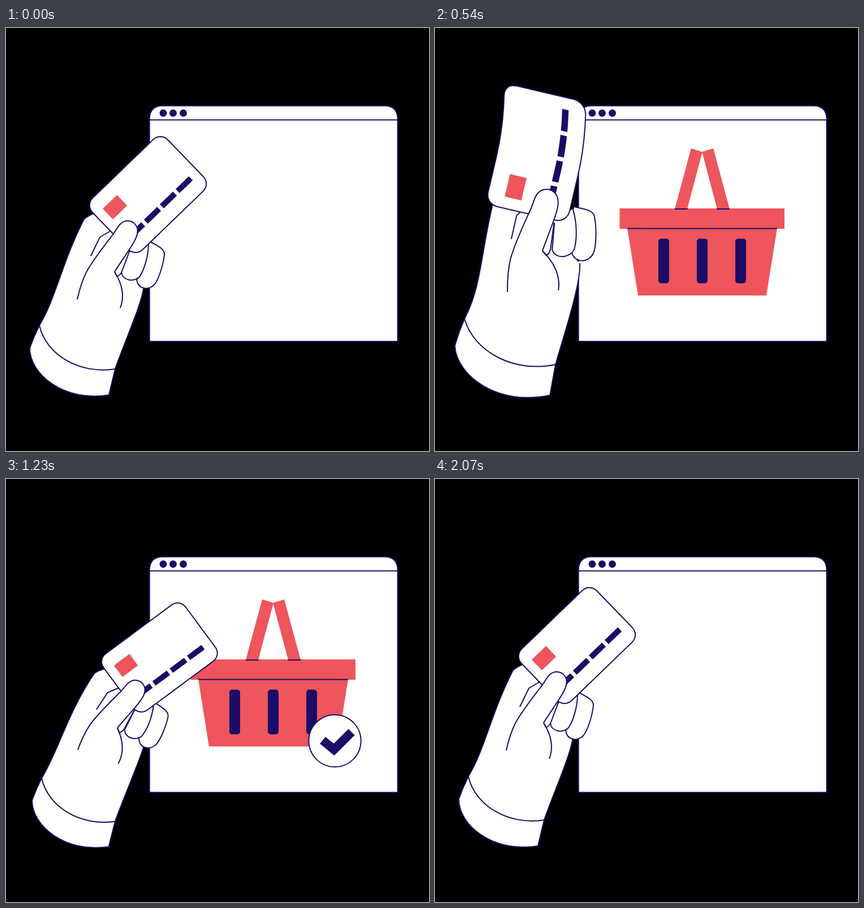
An HTML page for the animation above (2.1 s loop, 748 by 748 pixels).

```html
<!DOCTYPE html>
<html lang="en">
<head>
<meta charset="utf-8">
<title>Online checkout</title>
<style>
  html, body { margin: 0; width: 100%; height: 100%; overflow: hidden; background: #000; }
  svg { display: block; width: 100vw; height: 100vh; }
  .line { fill: none; stroke: #1b0c66; stroke-width: 2; stroke-linejoin: round; }
  .paper { fill: #fff; }
  .navy { fill: #1b0c66; }
  .red { fill: #ee555d; }
  .hand path { vector-effect: non-scaling-stroke; }
</style>
</head>
<body>
<svg viewBox="0 0 748 748">
  <clipPath id="screen"><rect x="254" y="163" width="438" height="390"/></clipPath>

  <path class="line paper" d="M253.7 554.3V161Q254 137.4 277 137.4H669Q692.6 137.4 692.6 161V554.3Z"/>
  <path class="line" d="M254 162.5H692"/>
  <g class="navy">
    <circle cx="278" cy="150.5" r="6.5"/><circle cx="295.5" cy="150.5" r="6.5"/><circle cx="313.5" cy="150.5" r="6.5"/>
  </g>

  <g id="basket">
    <path id="handles" class="red"/>
    <path id="body" class="red"/>
    <path id="rim" class="red"/>
    <path id="seams" class="line"/>
    <path id="slots" class="line navy" style="stroke-width:10"/>
  </g>

  <g id="badge">
    <circle class="line paper" r="46"/>
    <path id="check" class="line" d="M-21.5 -1L-1.5 15.5L29.5 -15.5" pathLength="1"
      style="stroke-width:15.5;stroke-linejoin:miter;stroke-dasharray:1 2"/>
  </g>

  <path id="arm" class="line paper"/>
  <path id="cuff" class="line"/>
  <g id="fingers" class="hand">
    <path class="paper" d="M155 330L240 390L236 450L140 470Z"/>
    <g id="curl">
      <path class="line paper" d="M255 378C270 386 281 391 280 401C278 420 269 447 262 454C252 465 232 462 231 443L240 400"/>
      <path class="line paper" d="M252 380C252 405 244 428 236 440C227 450 205 447 204 431L219 393"/>
    </g>
    <path class="line paper" d="M192 431L196 439Q202 438 205 430L219 393"/>
    <path class="line" d="M188 357L166 370L150 403"/>
  </g>
  <path id="card" class="line paper"/>
  <path id="chip" class="red"/>
  <path id="digits" class="navy"/>
  <g id="thumb" class="hand">
    <path class="line paper" d="M126 480C130 462 135 446 142 432C155 408 178 380 190 364C197 354 202 341 215 341C227 341 235 352 232 364C230 376 218 391 192 431"/>
    <path class="line" d="M192 431C202 447 212 470 202 495"/>
  </g>
</svg>

<script>
const LOOP = 2100, STEP = 30;
const el = Object.fromEntries([...document.querySelectorAll('[id]')].map(e => [e.id, e]));
const draw = (name, d) => el[name].setAttribute('d', d);
const show = (name, on) => { el[name].style.display = on ? '' : 'none'; };

// Palm poses: time, x, y, rotation, scale. Arm, fingers and card follow the palm.
const rest = [192, 431, 0, 1];
const poses = [
  [0, ...rest],
  [360, 146, 416, -11.8, 1.026],  // pull back
  [540, 190, 394, -13.1, 1.165],  // raise
  [780, 311, 484, 47.5, .904],    // tap
  [1230, 197, 440, 7.5, .975],    // return
  [1560, 182, 430, -3, 1.011],    // overshoot
  [2070, ...rest]
];

const rad = deg => deg * Math.PI / 180;
const ramp = (t, from, to) => Math.min(1, Math.max(0, (t - from) / (to - from)));
const smooth = u => u * u * (3 - 2 * u);
const bell = (t, mid, half) => Math.cos(Math.PI / 2 * Math.min(1, Math.abs(t - mid) / half)) ** 2;
const ring = (t, decay, period) => Math.exp(-t / decay) * Math.cos(2 * Math.PI * t / period);
const backIn = u => u * u * (2.9 * u - 1.9);

// Cubic track that flattens at its turning points.
function sample(keys, t) {
  const last = keys.length - 1;
  if (t >= keys[last][0]) return keys[last].slice(1);
  const i = keys.findIndex((k, n) => t < keys[n + 1][0]);
  const span = keys[i + 1][0] - keys[i][0], u = (t - keys[i][0]) / span;
  const slope = (n, c) => (keys[n + 1][c] - keys[n][c]) / (keys[n + 1][0] - keys[n][0]);
  const tangent = (n, c) => {
    if (n === 0 || n === last) return 0;
    const a = slope(n - 1, c), b = slope(n, c);
    return a * b <= 0 ? 0 : 2 * a * b / (a + b);
  };
  return keys[i].slice(1).map((v, j) => {
    const c = j + 1;
    return v + (keys[i + 1][c] - v) * smooth(u)
      + span * u * (1 - u) * ((1 - u) * tangent(i, c) - u * tangent(i + 1, c));
  });
}

const fmt = ([x, y]) => x.toFixed(2) + ' ' + y.toFixed(2);
const poly = points => 'M' + points.map(fmt).join('L') + 'Z';

// Moves a point with a bone that sits at (ox, oy) at rest.
const bone = ([x, y, rot, s], ox, oy) => (px, py) => {
  const c = Math.cos(rad(rot)) * s, n = Math.sin(rad(rot)) * s;
  return [x + (px - ox) * c - (py - oy) * n, y + (px - ox) * n + (py - oy) * c];
};

function drawArm(t, [x, y, rot, s], palm) {
  const settle = 2.5 * bell(t, 1400, 500);
  const forearm = .45 * rot + .0035 * rot * rot - settle;
  const wrist = .3 * rot + .004 * rot * rot - settle;
  const corner = bone([x, y, forearm, 1 + (s - 1) * .8], 192, 431)(42, 566);
  const arm = bone([...corner, wrist, s], 42, 566);
  const P = (px, py) => fmt(palm(px, py)), A = (px, py) => fmt(arm(px, py));
  draw('arm', `M${P(155, 328)}Q${P(145, 332)} ${P(138, 338)}C${P(100, 412)} ${A(88, 478)} ${A(59, 526)}`
    + `Q${A(49, 546)} ${A(42, 566)}C${A(42, 612)} ${A(102, 662)} ${A(182, 649)}L${A(193, 603)}`
    + `C${A(210, 555)} ${P(238, 492)} ${P(243, 462)}`);
  draw('cuff', `M${A(59, 526)}C${A(71, 579)} ${A(132, 613)} ${A(193, 603)}`);
}

function drawHand([x, y, rot, s]) {
  for (const part of [el.fingers, el.thumb])
    part.setAttribute('transform', `translate(${x} ${y}) rotate(${rot}) scale(${s}) translate(-192 -431)`);
  el.curl.setAttribute('transform', `rotate(${-.28 * Math.abs(rot)} 240 390)`);
}

// The card whips back around the thumb and bends while the hand swings forward.
function drawCard(t, palm) {
  const flick = bone([215, 375, -20 * bell(t, 560, 280), 1], 215, 375);
  const place = bone([251, 294.5, -44, 1], 0, 0);
  const bend = .0015 * bell(t, 650, 320);
  const at = (x, y) => palm(...flick(...place(x, y - bend * Math.max(0, x + 20) ** 2)));
  const edge = (from, to, y) => Array.from({ length: 9 }, (_, i) => at(from + (to - from) * i / 8, y));
  const box = (l, top, w, h) => poly([...edge(l, l + w, top), ...edge(l + w, l, top + h)]);
  const corner = (sx, sy, turn) => Array.from({ length: 7 }, (_, i) => {
    const a = rad(turn + i * 15);
    return at(sx * 74.5 + 18 * Math.cos(a), sy * 45.5 + 18 * Math.sin(a));
  });
  draw('card', poly([
    ...edge(-74.5, 74.5, -63.5), ...corner(1, -1, -90), ...corner(1, 1, 0),
    ...edge(74.5, -74.5, 63.5), ...corner(-1, 1, 90), ...corner(-1, -1, 180)
  ]));
  draw('chip', box(-75, -37.5, 35, 26));
  draw('digits', [0, 1, 2, 3].map(i => box(-75 + 39 * i, 27, 32.5, 10)).join(''));
}

function drawBasket(t) {
  const grow = smooth(ramp(t, 120, 240)), since = Math.max(0, t - 240);
  const squash = ring(since, 58, 240);
  const sx = grow * (1 + .4 * squash), sy = grow * (1 - .4 * squash), bow = -24 * squash;
  const splay = 58 * Math.exp(-since / 50);
  const lean = -13.5 * smooth(ramp(t, 1350, 1600)), slide = 400 * ramp(t, 1620, 1850) ** 2;

  const at = (x, y) => [
    472.5 + (x - 472.5) * sx + lean * ramp(y, 452, 320) + slide,
    473 + (y - 473) * sy
  ];
  const P = (x, y) => fmt(at(x, y));
  const quad = points => poly(points.map(p => at(...p)));
  const line = (x1, x2, y) => `M${P(x1, y)}L${P(x2, y)}`;
  const turn = bone([435, 290, -splay, 1], 435, 290);
  const handle = side => quad([[424, 320], [453, 213], [473, 219], [446, 320]].map(p => {
    const [x, y] = turn(...p);
    return [side * (x - 472.5) + 472.5, y];
  }));

  show('basket', t > 120 && t < 1850);
  el.basket.setAttribute('clip-path', t > 1400 ? 'url(#screen)' : 'none');
  draw('handles', handle(1) + handle(-1));
  draw('rim', quad([[326.5, 319], [618, 319], [618, 355], [326.5, 355]]));
  draw('body', `M${P(340, 354)}L${P(605, 354)}Q${P(595.5 - bow, 413)} ${P(586, 473)}`
    + `L${P(359, 473)}Q${P(349.5 + bow, 413)} ${P(340, 354)}Z`);
  draw('seams', line(340, 605, 354.5) + line(424, 447, 320) + line(498, 521, 320));
  draw('slots', [400, 468, 536].map(l =>
    quad([[l, 377.5], [l + 9, 377.5], [l + 9, 446.5], [l, 446.5]])).join(''));
}

function drawBadge(t) {
  const size = t < 747 ? 0 : 1 - ring(t - 747, 90, 360) - backIn(ramp(t, 1470, 1830));
  const drawn = smooth(ramp(t, 810, 960));
  show('badge', size > .01);
  show('check', drawn > 0);
  el.badge.setAttribute('transform', `translate(581.5 463) scale(${size})`);
  el.check.style.strokeDashoffset = 1 - drawn;
}

function render(t) {
  const pose = sample(poses, t), palm = bone(pose, 192, 431);
  drawArm(t, pose, palm);
  drawHand(pose);
  drawCard(t, palm);
  drawBasket(t);
  drawBadge(t);
}

const start = performance.now();
function tick(now) {
  const t = Math.max(0, now - start) % LOOP;
  render(Math.floor(t / STEP) * STEP);
  requestAnimationFrame(tick);
}
render(0);
requestAnimationFrame(tick);
</script>
</body>
</html>
```
